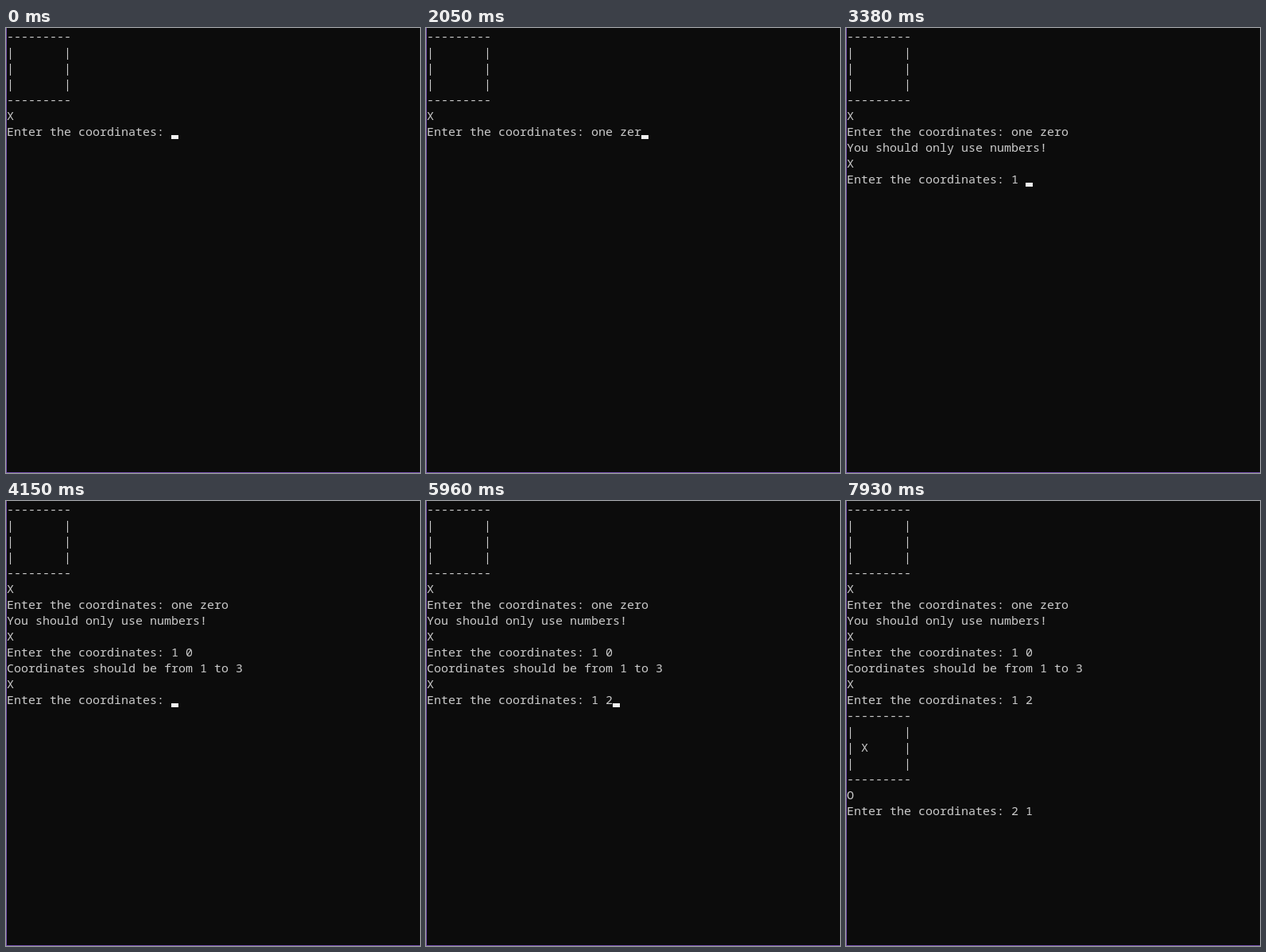
These frames come from a looping animation (521 by 561 pixels, 8000 ms). An HTML page:

```html
<!DOCTYPE html>
<html lang="en">
<head>
<meta charset="utf-8">
<title>Console game</title>
<style>
  html, body { margin: 0; width: 100%; height: 100%; overflow: hidden; background: #0c0c0c; }
  #console {
    position: absolute; left: 0; top: 0; width: 521px; height: 561px;
    box-sizing: border-box; overflow: hidden;
    border: solid #7550ad; border-width: 0 0 1px 1px;
    background: #0c0c0c; color: #ccc;
  }
  #log {
    margin: 0; white-space: pre;
    font: 15px/20px "Noto Sans Mono", "DejaVu Sans Mono", monospace;
    font-variant-ligatures: none; font-kerning: none;
  }
  #cursor { position: absolute; left: 0; top: 0; width: 9px; height: 5px; background: #f2f2f2; }
</style>
</head>
<body>
<div id="console"><pre id="log"></pre><div id="cursor"></div></div>
<script>
const LOOP = 8000, CELL = 9, ROW = 20;
const log = document.getElementById("log");
const cursor = document.getElementById("cursor");

const rule = "---------\n";
const empty = "|       |\n";
const board = middle => rule + empty + middle + empty + rule;
const prompt = player => player + "\nEnter the coordinates: ";

// [time in ms, text added, cursor visible]
const steps = [
  [0, board(empty) + prompt("X"), 1],
  [100, "", 0], [430, "", 1],
  [530, "o", 1], [600, "n", 0], [660, "", 1],
  [1060, "", 0], [1390, "e", 1], [1720, " ", 1],
  [1820, "z", 0], [1890, "", 1], [1980, "e", 1], [2050, "r", 1],
  [2150, "o", 0], [2220, "", 1],
  [2550, "\nYou should only use numbers!\n" + prompt("X"), 0], [2620, "", 1],
  [2790, "", 0], [3120, "", 1],
  [3220, "1", 0], [3290, "", 1], [3380, " ", 1], [3780, "0", 1],
  [4080, "\nCoordinates should be from 1 to 3\n" + prompt("X"), 0], [4150, "", 1],
  [4350, "", 0], [4680, "", 1],
  [4850, "1", 0], [4910, "", 1], [5040, " ", 1],
  [5400, "", 0], [5730, "", 1], [5960, "2", 1],
  [6210, "\n" + board("| X     |\n") + prompt("O"), 0], [6280, "", 1],
  [6640, "", 0], [6970, "", 1],
  [7070, "2", 0], [7140, "", 1], [7270, " ", 1],
  [7670, "1", 1], [7930, "", 0]
];

let typed = "";
const states = steps.map(([time, added, visible]) => {
  typed += added;
  const lines = typed.split("\n");
  return {
    time, visible, text: typed,
    x: lines[lines.length - 1].length * CELL,
    y: (lines.length - 1) * ROW + 15
  };
});

let shown = null;
function show(time) {
  let state = states[0];
  for (const s of states) if (s.time <= time) state = s;
  if (state === shown) return;
  shown = state;
  log.textContent = state.text;
  cursor.style.transform = `translate(${state.x}px, ${state.y}px)`;
  cursor.style.visibility = state.visible ? "visible" : "hidden";
}

const start = performance.now();
function tick() {
  show((performance.now() - start) % LOOP);
  requestAnimationFrame(tick);
}
tick();
</script>
</body>
</html>
```
